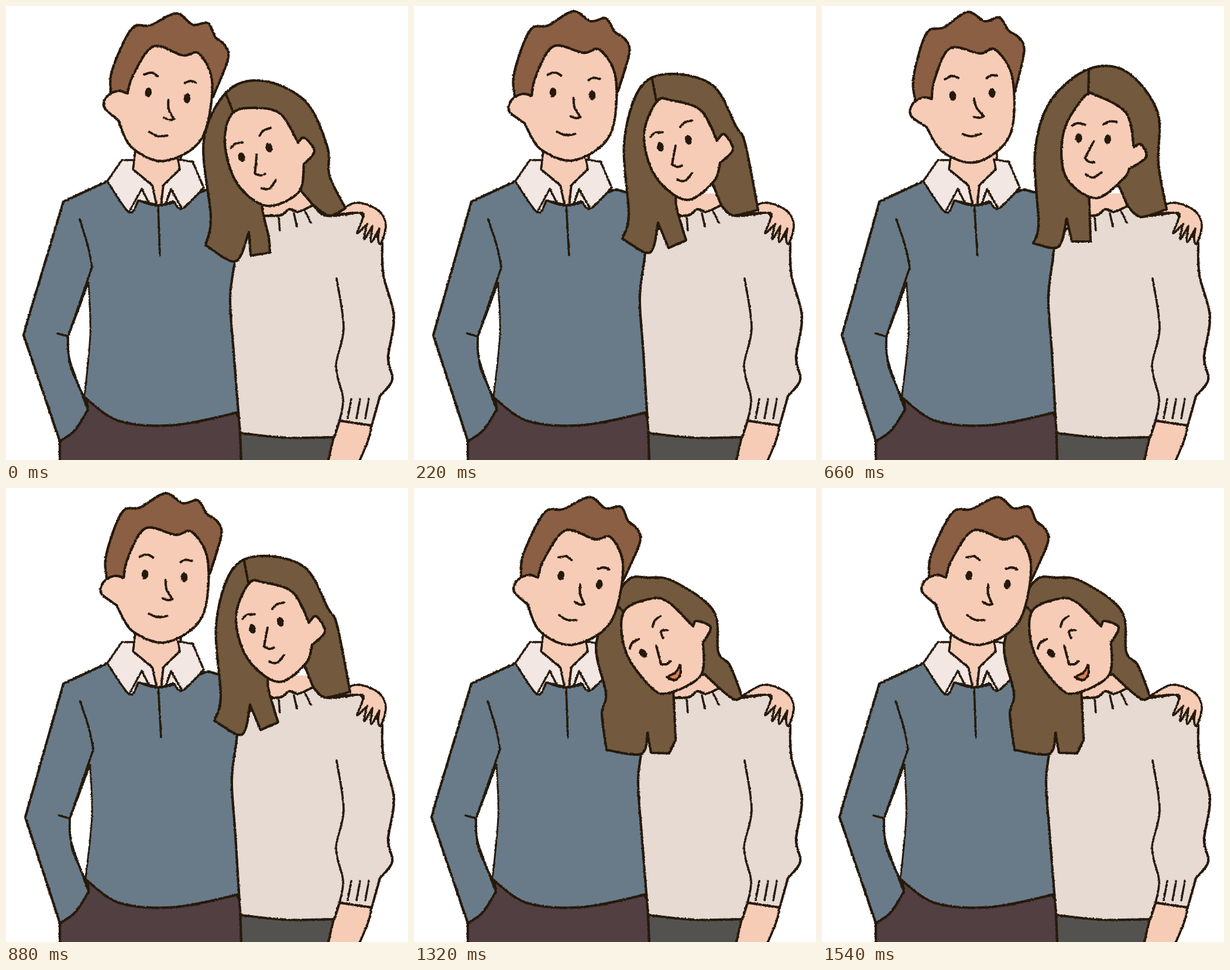
These frames come from a looping animation (687x775 px, 1.76 s). An HTML page:

```html
<!DOCTYPE html>
<html lang="en">
<head>
<meta charset="utf-8">
<title>Couple</title>
<style>
html, body { margin: 0; width: 100%; height: 100%; overflow: hidden; background: #fff; }
svg { display: block; width: 100%; height: 100%; }
path { stroke: #25190b; stroke-linecap: round; stroke-linejoin: round; }
ellipse { fill: #25190b; }
</style>
</head>
<body>
<svg id="stage" viewBox="0 0 687 775"></svg>
<script>
const SKIN = '#f7ccb7', BLUE = '#697b89', PANTS = '#513f42', LINEN = '#f2e7e2',
  KNIT = '#e7dad2', SKIRT = '#54524e', MAN_HAIR = '#8b5f44', HAIR = '#73593e';

// Sideways bend of the torsos, strongest at the waist.
let sway = 0;
const bend = (x, y) => x < 450 && y > 330 && y < 750
  ? [x + sway * Math.sin(Math.PI * (y - 330) / 420), y] : [x, y];

// Points form smooth runs; "/" marks a sharp corner at the point before it.
const curve = (text, closed) => {
  const runs = text.split('/').map(run => {
    const n = run.split(' ').map(Number), pts = [];
    for (let i = 0; i < n.length; i += 2) pts.push(bend(n[i], n[i + 1]));
    return pts;
  });
  const first = runs[0][0];
  if (closed) runs.at(-1).push(first);
  let d = 'M' + first, last;
  for (const run of runs) {
    const p = last ? [last, ...run] : run;
    for (let i = 0; i + 1 < p.length; i++) {
      const b = p[i], c = p[i + 1], a = p[i - 1] || b, e = p[i + 2] || c;
      const h1 = b.map((v, k) => v + (c[k] - a[k]) / 6);
      const h2 = c.map((v, k) => v - (e[k] - b[k]) / 6);
      d += `C${h1} ${h2} ${c}`;
    }
    last = p.at(-1);
  }
  return d;
};
const path = (d, fill, width) => `<path d="${d}" fill="${fill}" stroke-width="${width}"/>`;
const shape = (pts, fill, width = 4.2) => path(curve(pts, true) + 'Z', fill, width);
const lines = (text, width = 4) =>
  text.split(';').map(pts => path(curve(pts), 'none', width)).join('');
const eye = (x, y, tilt) =>
  `<ellipse rx="5.8" ry="8.3" transform="translate(${x} ${y}) rotate(${tilt})"/>`;
const group = (transform, content) => `<g transform="${transform}">${content}</g>`;
const turned = (x, y, angle, content) =>
  group(`translate(${x} ${y}) rotate(${angle})`, content);

const manBody = () =>
  shape('92 780/92 743/140 688/137 668/392 690/401 780', PANTS) +
  shape('173 299/98 334/42 520 30 562/92 743/118 724 140 689/134 668/195 709 292 715 412 690/405 330/345 313/255 340', BLUE) +
  shape('141 472/144 560 134 668/110 615 106 565/125 515', '#fff', 3) +
  lines('126 364 140 410 147 446/106 564;88 559 106 564;106 564 109 605 140 689;260 342 263 426', 3.6) +
  shape('222 240/217 279/250 306/257 340/265 340/269 306/297 279/292 240', SKIN, 3.6) +
  shape('173 299/198 263/219 263/217 279/250 306/257 339/226 332/210 352', LINEN, 3.6) +
  shape('338 310/319 266/294 262/297 279/269 306/265 340/287 333/301 346', LINEN, 3.6) +
  lines('210 352/232 312/244 336;301 346/282 313/273 337', 3.6);

const cuffRibs = [0, 15, 30].map(x => `${590 + x} 671 ${584 + x} 704`).join(';');
const hand = () => shape('560 356/597 336 635 348 649 373 641 405 636 399 638 380/624 403 626 376/612 398 617 372/600 388 609 364 606 353', SKIN, 3.6);

const womanBody = () =>
  shape('400 725/402 780/550 780/562 730', SKIRT) +
  shape('568 700/550 780/603 780/623 714', SKIN, 3.8) +
  shape('435 320/525 320/525 345/438 362', SKIN, 0) +
  shape('440 358 470 357 484 347 500 351 525 340/548 358 605 352/643 405/645 460 663 530 653 600 660 638 639 666/625 716/570 708/561 736/480 737 400 729/389 590 383 500 391 437/400 400', KNIT) +
  lines('565 465 577 550 564 615 576 670 570 708', 3.6) +
  lines('466 360 468 383;492 354 497 376;511 350 521 370;' + cuffRibs, 3.5) +
  hand();

const manFeatures =
  lines('-42 -32 -30 -36 -19 -31;28 -23 37 -27 47 -25;2 8 4 24 14 40/7 42 -3 39;-26 65 -12 71 5 69') +
  eye(-33, -2, 2) + eye(34, 3, 2);
const manHead =
  shape('172 155 171 115 198 42 230 33 272 9 302 26 328 21 343 44 360 56 368 80 348 147/300 130/201 153', MAN_HAIR) +
  shape('201 153/185 150 167 160 163 180 189 200/217 245 275 263 335 220 345 125 318 75 290 80 238 69 208 120', SKIN);
const man = (matrix, x, y, angle) =>
  group(`matrix(${matrix})`, manHead) + turned(x, y, angle, manFeatures);

const calm = lines('5 62 18 64 30 51') + eye(24, -6, -15);
const wink = lines('18 -3 20 -15 31 -12') +
  shape('-4 60/13 59 25 51/20 64 9 71 0 66', '#dd7f53');
const womanFeatures =
  lines('-41 -11 -33 -18 -20 -19;10 -28 18 -36 30 -39;2 4 -1 20 -4 36/5 40 13 38') +
  eye(-24, 6, -15);
const woman = (hair, face, parting, x, y, angle, mood = calm) =>
  shape(hair, HAIR) + shape(face, SKIN) + lines(parting) +
  turned(x, y, angle, womanFeatures + mood);

const leaning = woman(
  '341 408/350 360 338 230 378 146 440 128 512 163 549 240 553 290 580 345/553 358 525 340/502 313/440 325/438 347 449 395 451 421/418 426/415 386/392 436',
  '509 270/527 248 510 225 499 233/470 185 430 174 387 183 374 235 395 303 445 341 500 318',
  '375 148 388 181', 426, 250, -5.4);
const tilted = woman(
  '356 397/367 355 359 235 385 142 435 116 510 135 550 205 566 235 588 348/545 357 525 340/511 305/450 310/448 340 465 400/435 413/417 370/403 421',
  '523 268/545 245 530 219 518 230/490 178 440 161 415 163 393 220 412 290 465 331 512 300',
  '407 125 414 161', 445, 234.5, 0);
const upright = woman(
  '361 405/370 370 364 250 390 163 455 108 520 112 573 180 575 270 589 347/545 360 522 341/508 308/455 305/457 340 459 402/427 402/418 363/404 411',
  '525 278/554 258 545 236 533 241/520 183 470 153 448 155 413 215 416 290 467 328 515 295',
  '456 109 455 151', 463.5, 226.5, 16.4);
const cuddling = woman(
  '329 447/321 385 328 350 312 262 360 163 400 153 445 160 512 210 520 280 540 303 561 357/547 361 522 342/497 318/440 330/443 345 447 430/436 453/405 452/399 418/388 454',
  '494 264/507 238 483 227 477 236/435 195 405 189 358 212 362 280 405 340 435 350 490 320',
  '347 200 358 212', 410.5, 266.5, -25, wink);

const pose = (shift, her, him) => {
  sway = shift;
  return `<g class="pose">${manBody()}${womanBody()}${her}${him}</g>`;
};
const poses =
  pose(0, leaning, man('.988 .084 -.09 .991 22.9 -19.3', 276, 152, 4.4)) +
  pose(3, tilted, man('1 0 0 1 0 0', 270.5, 149.5, 0)) +
  pose(4, upright, man('.97 -.045 .056 1.008 -16 13.4', 256.5, 150.5, -8.6)) +
  pose(0, cuddling, man('.987 .079 -.126 .991 32.6 -14.8', 283.5, 156.5, 8.7));

const stage = document.getElementById('stage');
stage.innerHTML = `<filter id="crayon" color-interpolation-filters="sRGB">
  <feTurbulence type="fractalNoise" baseFrequency=".35" numOctaves="2" seed="4"/>
  <feDisplacementMap in="SourceGraphic" scale="3" xChannelSelector="R" yChannelSelector="G"/>
</filter><g filter="url(#crayon)">${poses}</g>`;

const groups = stage.querySelectorAll('.pose');
const order = [0, 1, 2, 2, 1, 0, 3, 3];
const draw = time => {
  const now = order[Math.floor(time / 220) % order.length];
  groups.forEach((g, i) => g.style.display = i === now ? '' : 'none');
  requestAnimationFrame(draw);
};
draw(0);
</script>
</body>
</html>
```
